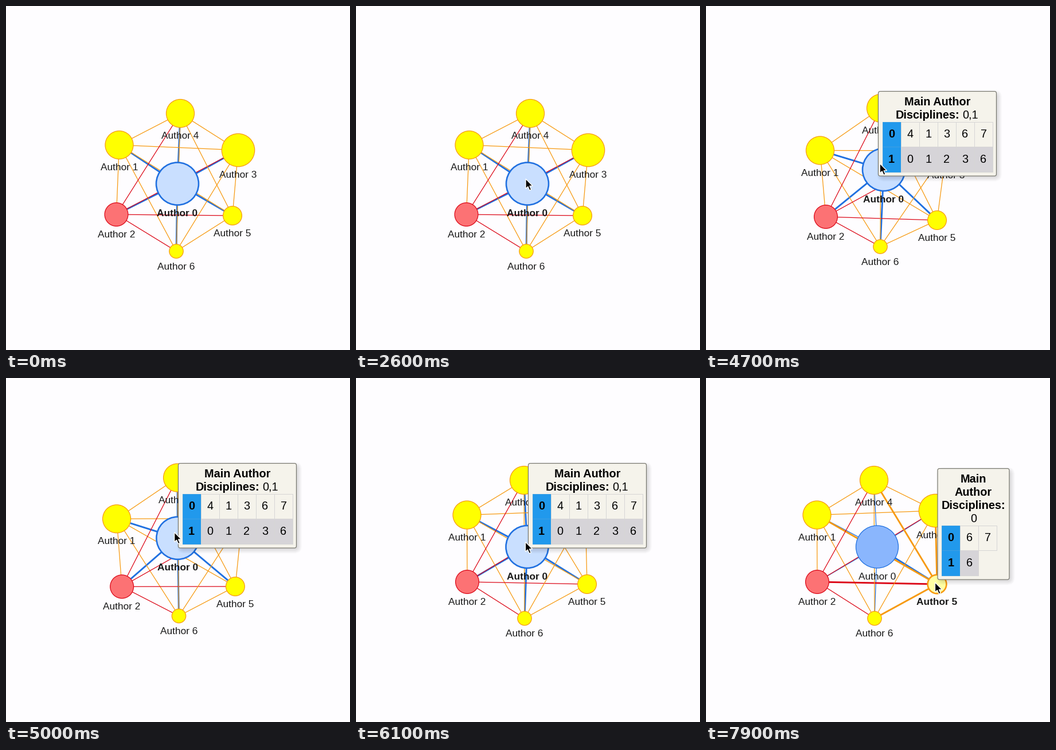
Write a matplotlib script that moves like this. It is 600 px wide and 599 px high and loops after 8000 ms.

```python
from itertools import combinations

import numpy as np
import matplotlib.pyplot as plt
from matplotlib.animation import FuncAnimation
from matplotlib.collections import LineCollection
from matplotlib.patches import Circle, FancyBboxPatch, Polygon, Rectangle

W, H, DPI = 600, 599, 100
PX = 72 / DPI                      # points per pixel
STEP, FRAMES = 100, 80
FONT = "Liberation Sans"

BLUE, ORANGE, RED, YELLOW = "#2070E0", "#F79A12", "#DC0818", "#FFFF00"
PAPER, CELL_BLUE, CELL_GREY = "#F5F3EB", "#2199EC", "#D6D4D8"
THIN, THICK = 1.25 * PX, 2.9 * PX

RADII = [37, 24.5, 20.4, 28.7, 24.5, 16.4, 12.2]
BORDERS = [BLUE, ORANGE, RED] + [ORANGE] * 4
FILLS = ["#8AB6FD", YELLOW, "#FC7274"] + [YELLOW] * 4
LIT_FILLS = {0: "#C9DFFF", 5: "#FFFFA3"}

# Layout at rest, then where each pull of the drag brings it
POSES = np.array([
    [(299, 309.5), (197.5, 242), (192.5, 363), (405, 251), (304, 187), (395, 365), (297, 427)],
    [(310, 285), (199, 251.5), (209, 367), (419, 252), (305, 178), (403, 373), (304, 419)],
    [(293, 275), (189.5, 241.5), (198, 361), (408, 240), (295.5, 171), (398, 357), (300, 411.5)],
    [(298.5, 294), (193.5, 238.5), (194, 355), (400, 231), (293, 178), (403, 359), (294, 418.5)],
])
PULLS = [4450, 4700, 5400, 6100]

GRIP = np.array([-3, -8.5])        # pointer tip relative to the dragged node
POINTER_LEAD = 100
POINTER_IN, POINTER_OUT = np.array([620, 336]), np.array([399.5, 356])
ARROW = np.array([(0, 0), (0, 17), (3.9, 13.4), (6.7, 20), (9.7, 18.7),
                  (6.9, 12.3), (12.2, 12.3)])


def progress(t, start, end):
    return np.clip((t - start) / (end - start), 0, 1)


def layout(t):
    """Node centres: every pull starts fast and eases out."""
    pose = POSES[0]
    for start, end, a, b in zip(PULLS, PULLS[1:], POSES, POSES[1:]):
        pose = pose + (b - a) * np.sin(progress(t, start, end) * np.pi / 2)
    return pose


def pointer_tip(t):
    """Glide in, hold the main node while it is dragged, then leave."""
    held = layout(t + POINTER_LEAD if t > PULLS[0] else t)[0] + GRIP
    u = progress(t, 500, 2300)
    tip = POINTER_IN + (held - POINTER_IN) * u * u * (3 - 2 * u)
    v = progress(t, 6900, 7400)
    return tip + (POINTER_OUT - tip) * v * (2 - v)


fig = plt.figure(figsize=(W / DPI, H / DPI), dpi=DPI, facecolor="#FEFDFF")
ax = fig.add_axes([0, 0, 1, 1])
ax.set_xlim(0, W)
ax.set_ylim(H, 0)
ax.axis("off")


def write(x, y, text, size, bold=False, color="black", z=10):
    return ax.text(x, y, text, fontsize=size * PX, family=FONT, ha="center",
                   va="baseline", weight="bold" if bold else "normal",
                   color=color, zorder=z)


def panel(x, y, w, h, radius, **style):
    shape = f"round,pad=0,rounding_size={radius}"
    return ax.add_patch(FancyBboxPatch((x, y), w, h, boxstyle=shape, zorder=10, **style))


def tooltip(t, w, lines, rows):
    """Hidden popup beside the pointer; a line is a list of (dx, text, bold)."""
    pad, line_h, cell_w, cell_h = 7, 23, 32.1, 43.7
    table_y = pad + line_h * len(lines)
    h = table_y + cell_h * len(rows) + pad
    x, y = pointer_tip(t) + (4.5, -5 - h)

    parts = [panel(x + 3.5 - g, y + 3.5 - g, w + 2 * g, h + 2 * g, g + 7,
                   fc="black", ec="none", alpha=0.015) for g in range(-5, 7)]
    parts.append(panel(x, y, w, h, 3.5, fc=PAPER, ec="#77776E", lw=1.2 * PX))
    for i, line in enumerate(lines):
        for dx, text, bold in line:
            parts.append(write(x + w / 2 + dx, y + 24 + i * line_h, text, 19.9, bold))
    for r, row in enumerate(rows):
        for c, digit in enumerate(row):
            cx, cy = x + pad + c * cell_w, y + table_y + r * cell_h
            fill = CELL_BLUE if c == 0 else (PAPER, CELL_GREY)[r]
            edge = "#3F9FE2" if c == 0 else "#D6D5D5"
            parts.append(ax.add_patch(Rectangle(
                (cx, cy), cell_w, cell_h, fc=fill, ec=edge, lw=PX, zorder=10)))
            parts.append(write(cx + cell_w / 2, cy + 27.8, digit, 19.9, c == 0))
    return parts


pairs = list(combinations(range(len(RADII)), 2))
edges = LineCollection([], colors=[BORDERS[a] for a, _ in pairs], zorder=1)
ax.add_collection(edges)

discs = [ax.add_patch(Circle((0, 0), r, fc=f, ec=e, zorder=2))
         for r, f, e in zip(RADII, FILLS, BORDERS)]
labels = [write(0, 0, f"Author {n}", 17.3, color="#1A1A1A", z=3)
          for n in range(len(RADII))]

main_lines = [[(0, "Main Author", True)],
              [(-16.8, "Disciplines:", True), (58, "0,1", False)]]
side_lines = [[(0, "Main", True)], [(0, "Author", True)],
              [(0, "Disciplines:", True)], [(0, "0", False)]]
main_rows, side_rows = ["041367", "101236"], ["067", "16"]
popups = [
    (2700, 6500, tooltip(2700, 206, main_lines, main_rows)),
    (6500, 7000, tooltip(6500, 206, main_lines, main_rows)),
    (7800, 8000, tooltip(7800, 125, side_lines, side_rows)),
]
pointer = ax.add_patch(Polygon(ARROW, closed=True, fc="black", ec="white",
                               lw=1.3 * PX, joinstyle="miter", zorder=20))


def update(frame):
    t = frame * STEP
    lit = 0 if t < 7000 else 5 if t >= 7700 else None
    centres = layout(t)

    edges.set_segments([(centres[a], centres[b]) for a, b in pairs])
    edges.set_linewidths([THICK if lit in pair else THIN for pair in pairs])

    for n, (x, y) in enumerate(centres):
        on = n == lit
        discs[n].center = (x, y)
        discs[n].set_facecolor(LIT_FILLS[n] if on else FILLS[n])
        discs[n].set_linewidth(2.6 * PX if on else THIN)
        labels[n].set_position((x, y + RADII[n] + 19.7))
        labels[n].set_weight("bold" if on else "normal")

    for start, end, parts in popups:
        for part in parts:
            part.set_visible(start <= t < end)

    pointer.set_xy(ARROW + pointer_tip(t))
    return []


anim = FuncAnimation(fig, update, frames=FRAMES, interval=STEP,
                     repeat=True, repeat_delay=0, blit=False)
plt.show()
```
